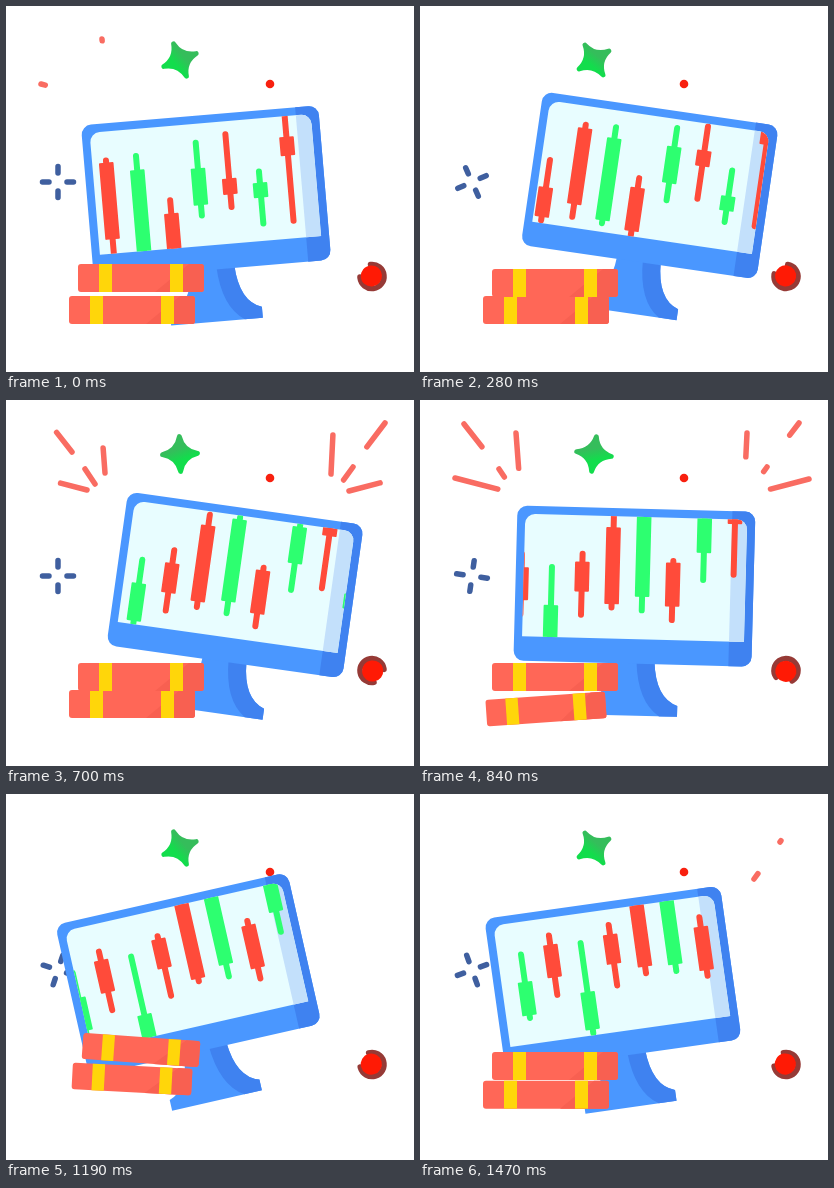
Write an HTML page with a canvas that moves like this. It is 408 px wide and 366 px high and loops after 1540 ms.

```html
<!DOCTYPE html>
<html>
<head>
<meta charset="utf-8">
<style>
html, body { margin: 0; width: 100%; height: 100%; overflow: hidden; background: #fff; }
canvas { display: block; }
</style>
</head>
<body>
<canvas id="stage" width="408" height="366"></canvas>
<script>
const ctx = document.getElementById('stage').getContext('2d');
const STEP = 70, STEPS = 22, TAU = 2 * Math.PI;
const RED = '#ff4b3a', GREEN = '#2dff70', BLUE = '#4a97ff', DARK_BLUE = '#3f82f0', CORAL = '#ff6757';

const clamp = v => Math.min(1, Math.max(0, v));
const smooth = v => (v = clamp(v)) * v * (3 - 2 * v);
const wave = (i, peak, period) => Math.cos(TAU * (i - peak) / period);

// Linear interpolation over keys of the form [step, value, ...].
function track(keys, i) {
  const n = keys.findIndex(k => k[0] > i);
  if (n < 0) return keys[keys.length - 1].slice(1);
  const a = keys[n - 1], b = keys[n], f = (i - a[0]) / (b[0] - a[0]);
  return a.slice(1).map((v, j) => v + (b[j + 1] - v) * f);
}

function placed(x, y, degrees, draw) {
  ctx.save();
  ctx.translate(x, y);
  ctx.rotate(degrees * Math.PI / 180);
  draw();
  ctx.restore();
}

function fill(color, path) {
  ctx.fillStyle = color;
  ctx.fill(typeof path === 'string' ? new Path2D(path) : path);
}

function box(x, y, w, h, r = 0) {
  const p = new Path2D();
  p.roundRect(x, y, w, h, r);
  return p;
}

function disc(x, y, r, color) {
  const p = new Path2D();
  p.arc(x, y, r, 0, TAU);
  fill(color, p);
}

function line(color, width, x1, y1, x2, y2) {
  ctx.strokeStyle = color;
  ctx.lineWidth = width;
  ctx.lineCap = 'round';
  ctx.beginPath();
  ctx.moveTo(x1, y1);
  ctx.lineTo(x2, y2 + 0.01);
  ctx.stroke();
}

// Left to right: colour, wick top, wick length, body height, body swing along the wick.
const candles = [
  [GREEN, -116, 70, 34, -13],
  [RED, -131, 66, 33, 5],
  [GREEN, -119, 97, 38, -33],
  [RED, -133, 67, 30, 13],
  [RED, -173, 99, 77, -6],
  [GREEN, -175, 103, 83, 7],
  [RED, -128, 65, 44, 6],
  [GREEN, -183, 79, 37, 9],
  [RED, -189, 79, 16, 24],
  [GREEN, -149, 58, 15, -17],
  [RED, -254, 163, 19, 20]
];

function drawChart(i) {
  const shift = 6.22 * i;
  candles.forEach(([color, wickTop, length, height, swing], n) => {
    const slot = n - 4, x = -97 + shift + slot * 30.3, top = wickTop - 0.41 * shift;
    const body = top + (length - height) / 2 - swing * wave(i, 15 - 1.2 * slot, 28);
    line(color, 6, x, top + 3, x, top + length - 3);
    fill(color, box(x - 7.3, body, 14.6, height, 1));
  });
}

function drawMonitor(i) {
  const phase = TAU * (i - 1.45) / STEPS;
  const tilt = 13 * Math.sin(phase) - 0.4 * Math.sin(3 * phase);
  const baseY = 306.5 + 9.5 * ((1 + wave(i, 0.5, STEPS / 2)) / 2) ** 1.8;
  placed(211, baseY, tilt, () => {
    fill(BLUE, 'M-22,-55 Q-24,-18 -46,-11 V0 H46 V-11 Q24,-18 22,-55Z');
    fill(DARK_BLUE, 'M4,-55 Q6,-14 28,0 H46 V-11 Q24,-18 22,-55Z');
    fill(BLUE, box(-119, -207, 238, 155, 10));
    fill(DARK_BLUE, box(96, -207, 23, 155, [0, 10, 10, 0]));
    const screen = box(-111, -199, 222, 122.5, [10, 10, 0, 0]);
    fill('#e8fdff', screen);
    ctx.save();
    ctx.clip(screen);
    fill('#c3e0fb', box(96, -199, 15, 125));
    drawChart(i);
    ctx.restore();
  });
}

// Steps since take-off, height, tilt, scale.
const hop = [[0, 0, 0, 1], [2, 5, -4, 0.95], [4, -15, -3, 0.94], [5, -21, 4, 0.93],
  [7, -19, 3, 0.95], [9, -5, 0, 1], [10.5, -5, 0, 1], [12, 0, 0, 1]];

function drawBook(x, y, start, i) {
  const [dy, degrees, scale] = track(hop, (i + STEPS - start) % STEPS);
  placed(x, y + dy, degrees, () => {
    ctx.scale(scale, scale);
    fill(CORAL, box(-63, -14, 126, 28, 3));
    fill('#f86051', 'M48,-14 H60 Q63,-14 63,-11 V11 Q63,14 60,14 H14Z');
    for (const sx of [-42, 29]) fill('#ffd60a', box(sx, -14, 13, 28));
  });
}

// Inner point, outer point, step at which the ray shoots out.
const leftRays = [[66, 52, 44, 24, 7.2], [99, 73, 96, 33, 7.5], [89, 84, 79, 69, 6], [81, 90, 35, 78, 7.7]];
const rightRays = [[360, 48, 379, 23, 5.8], [325, 74, 327, 33, 6.2], [334, 85, 347, 67, 4.8], [343, 91, 389, 79, 7.3]];

function drawRays(rays, i) {
  for (const [x1, y1, x2, y2, start] of rays) {
    const head = clamp((i - start) / 4), tail = clamp((i - start - 4) / 4.3);
    if (head <= 0 || tail >= 1) continue;
    const at = f => [x1 + (x2 - x1) * f, y1 + (y2 - y1) * f];
    line('#f96c62', 5.5, ...at(tail), ...at(head));
  }
}

const crossTurn = [[0, 0], [4, 66], [12, 98], [14, 82], [17, 18], [21, -20]];

function drawOrnaments(i) {
  placed(174, 54, 36 - 38 * wave(i, 10, 17) * -1 - 76 * wave(i, 10, 17), () => {
    const shade = ctx.createLinearGradient(-4, -14, 6, 14);
    shade.addColorStop(0.3, '#35bd5b');
    shade.addColorStop(0.7, '#12dd4c');
    const star = new Path2D('M0,-17.5 Q3,-3 17.5,0 Q3,3 0,17.5 Q-3,3 -17.5,0 Q-3,-3 0,-17.5Z');
    ctx.strokeStyle = shade;
    ctx.lineWidth = 4.8;
    ctx.lineJoin = 'round';
    ctx.stroke(star);
    fill(shade, star);
  });
  placed(52, 176, track(crossTurn, i)[0], () => {
    for (let n = 0; n < 4; n++) {
      line('#3f5f9f', 5.5, 9, 0, 15.5, 0);
      ctx.rotate(TAU / 4);
    }
  });
  disc(264, 78, 4.3, '#f8200f');
  placed(366, 270.5, -140 + 355 * smooth((i - 2) / 16), () => {
    ctx.strokeStyle = '#963a36';
    ctx.lineWidth = 5.6;
    ctx.lineCap = 'round';
    ctx.beginPath();
    ctx.arc(0, 0, 12, 0.75, TAU - 0.75);
    ctx.stroke();
    disc(0.8, 0, 10.6, '#ff1a05');
  });
}

function frame() {
  const i = Math.floor(performance.now() / STEP) % STEPS;
  ctx.fillStyle = '#fff';
  ctx.fillRect(0, 0, 408, 366);
  // Each burst also runs across the loop seam.
  for (const s of [i, i + 15.6]) drawRays(leftRays, s);
  for (const s of [i, i - 15]) drawRays(rightRays, s);
  drawOrnaments(i);
  drawMonitor(i);
  drawBook(126, 304, 10, i);
  drawBook(135, 277, 12, i);
  requestAnimationFrame(frame);
}
frame();
</script>
</body>
</html>
```
